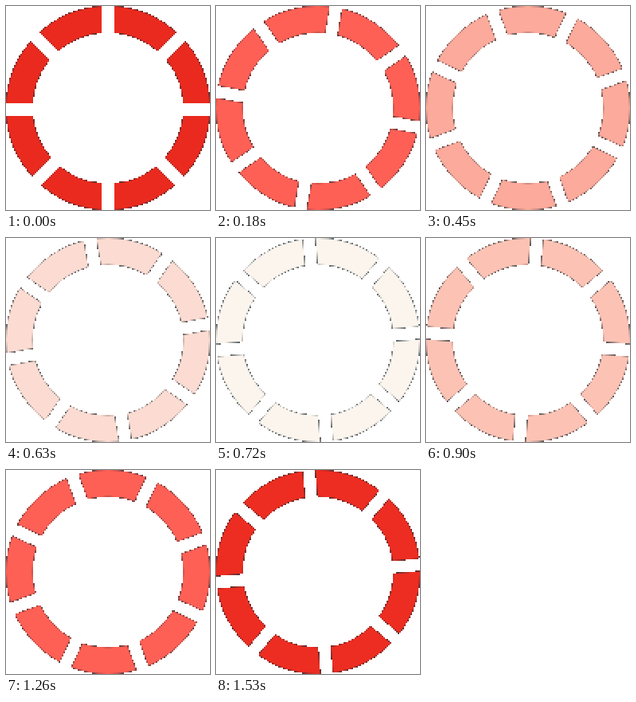
An HTML page with a canvas for the animation above (1620 ms loop, 256 by 256 pixels).

```html
<!DOCTYPE html>
<html lang="en">
<head>
<meta charset="utf-8">
<title>Ring spinner</title>
<style>
  html, body { margin: 0; width: 100%; height: 100%; overflow: hidden; background: #fff; }
  canvas { display: block; width: 256px; height: 256px; image-rendering: pixelated; }
</style>
</head>
<body>
<canvas id="stage" width="128" height="128"></canvas>
<script>
const ctx = document.getElementById('stage').getContext('2d', { willReadFrequently: true });
const SIZE = 128, STEPS = 18, STEP_MS = 90;
const MATTE = [36, 50, 58];

// Colour stops: [step, r, g, b]
const STOPS = [
  [0, 234, 42, 30], [2, 255, 96, 85], [5, 252, 170, 155], [8, 252, 245, 238],
  [10, 252, 195, 181], [14, 255, 96, 85], [16, 240, 48, 36], [18, 234, 42, 30]
];

function colourAt(step) {
  const i = STOPS.findIndex(stop => stop[0] > step);
  const [from, to] = [STOPS[i - 1], STOPS[i]];
  const k = (step - from[0]) / (to[0] - from[0]);
  return [1, 2, 3].map(c => from[c] + (to[c] - from[c]) * k);
}

function drawRing(step) {
  ctx.clearRect(0, 0, SIZE, SIZE);
  ctx.lineWidth = 16.75;
  ctx.beginPath();
  ctx.arc(64, 64, 55.625, 0, 2 * Math.PI);
  ctx.stroke();

  // Four crossing bars cut the ring into eight segments.
  ctx.save();
  ctx.globalCompositeOperation = 'destination-out';
  ctx.translate(64, 65);
  ctx.rotate(step * 5 * Math.PI / 180);
  ctx.lineWidth = 8;
  for (let i = 0; i < 4; i++) {
    ctx.beginPath();
    ctx.moveTo(0, -75);
    ctx.lineTo(0, 75);
    ctx.stroke();
    ctx.rotate(Math.PI / 4);
  }
  ctx.restore();
}

// Hard pixel edges: partly covered pixels blend into a dark matte.
function colourRing(colour) {
  const image = ctx.getImageData(0, 0, SIZE, SIZE), px = image.data;
  for (let i = 0; i < px.length; i += 4) {
    const cover = px[i + 3] / 255;
    for (let c = 0; c < 3; c++) px[i + c] = MATTE[c] + (colour[c] - MATTE[c]) * cover;
    px[i + 3] = cover > 0.25 ? 255 : 0;
  }
  ctx.putImageData(image, 0, 0);
}

let shown = -1;
function frame() {
  const step = Math.floor(performance.now() / STEP_MS) % STEPS;
  if (step !== shown) {
    drawRing(step);
    colourRing(colourAt(step));
    shown = step;
  }
  requestAnimationFrame(frame);
}
frame();
</script>
</body>
</html>
```
